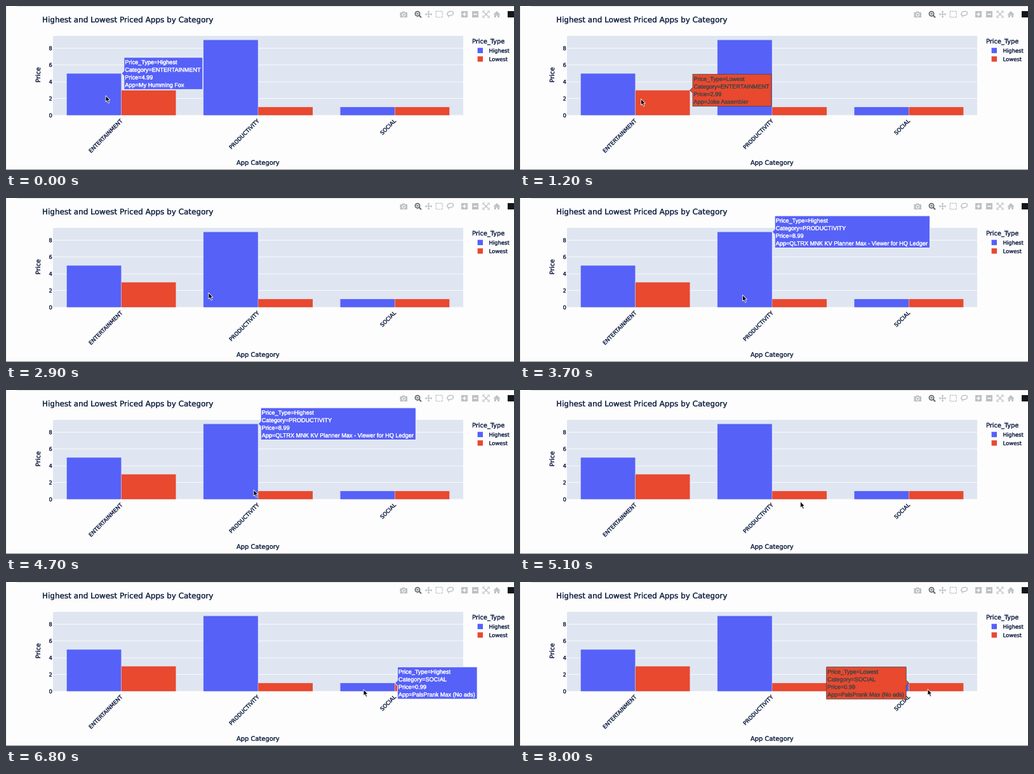
Write a matplotlib script that moves like this. It is 800 by 258 pixels and loops after 8.1 s.

```python
import numpy as np
import matplotlib.pyplot as plt
from matplotlib.animation import FuncAnimation
from matplotlib.patches import Circle, Ellipse, Polygon, Rectangle
from matplotlib.patheffects import withStroke

W, H = 800, 258
FRAMES, STEP = 81, 100

PAPER, PLOT, INK = "#fdfdfe", "#dfe6f2", "#1b2a4a"
BLUE, RED, DARK = "#5661f8", "#e8492f", "#444444"
ICON, ICON_ON = "#bfc0c4", "#66686e"

LEFT, RIGHT, TOP, BASE = 74, 720, 47, 172
UNIT = 13.21                      # pixels per price unit
SLOT = (RIGHT - LEFT) / 3
BAR_W = SLOT * 0.4

APPS = [
    ("ENTERTAINMENT", [(4.99, "My Humming Fox"), (2.99, "Joke Assembler")]),
    ("PRODUCTIVITY", [(8.99, "QLTRX MNK KV Planner Max - Viewer for HQ Ledger"),
                      (0.99, None)]),
    ("SOCIAL", [(0.99, "PalsPrank Max (No ads)")] * 2),
]
KINDS = [("Highest", BLUE, "white"), ("Lowest", RED, DARK)]

# pointer stops: step, x, y
STOPS = [(7, 157, 141), (17, 224, 151), (24, 234, 152), (29, 319, 149),
         (47, 390, 157), (57, 519, 165.5), (68, 563, 169), (76, 642, 168.5)]
DIPS = [(47, 57), (68, 76)]       # legs that pass below the axis
ARROW = np.array([(0, 0), (0, 9.8), (2.2, 7.8), (3.9, 11.8),
                  (5.7, 11.1), (4, 7.2), (7, 7.2)])

fig = plt.figure(figsize=(W / 100, H / 100), dpi=100, facecolor=PAPER)
ax = fig.add_axes([0, 0, 1, 1])
ax.set_xlim(0, W)
ax.set_ylim(H, 0)
ax.axis("off")


def pt(px):
    return px * 0.72


def write(x, y, s, size, font="DejaVu Sans", **kw):
    return ax.text(x, y, s, fontsize=pt(size), color=INK, family=font,
                   va="baseline",
                   path_effects=[withStroke(linewidth=pt(0.22))], **kw)


def add(shape):
    shape.set_snap(False)
    return ax.add_patch(shape)


def rect(x, y, w, h, color, **kw):
    return add(Rectangle((x, y), w, h, fc=color, **{"lw": 0, **kw}))


def disc(x, y, r, color, **kw):
    return add(Circle((x, y), r, fc=color, **{"lw": 0, **kw}))


def poly(points, color, **kw):
    return add(Polygon(points, closed=True, fc=color, **{"lw": 0, **kw}))


def line(xs, ys, color, width, **kw):
    ax.plot(xs, ys, color=color, lw=pt(width), solid_capstyle="butt",
            snap=False, **kw)


def cross(x, y, r, color, width):
    line([x - r, x + r], [y, y], color, width)
    line([x, x], [y - r, y + r], color, width)


def bar_box(cat, kind):
    x = LEFT + SLOT * (cat + 0.1) + BAR_W * kind
    return x, x + BAR_W, BASE - APPS[cat][1][kind][0] * UNIT


def draw_frame():
    line([17, W], [0.5, 0.5], "#dcdcdf", 1)
    line([0.5, 0.5], [0, H], "#e6e6e8", 1)
    line([0, W], [H - 0.5, H - 0.5], "#88888b", 1)


def draw_chart():
    rect(LEFT, TOP, RIGHT - LEFT, BASE - TOP, PLOT, zorder=1)
    for v in range(0, 9, 2):
        y = BASE - v * UNIT
        line([LEFT, RIGHT], [y, y], "white", 0.8, zorder=2)
        write(72.8, y + 3.1, str(v), 8.4, ha="right")
    for c, (name, _) in enumerate(APPS):
        for k, (_, color, _) in enumerate(KINDS):
            x0, x1, y = bar_box(c, k)
            rect(x0, y, x1 - x0, BASE - y, color, ec="#e5ecf6",
                 lw=pt(0.35), zorder=3)
        write(LEFT + SLOT * (c + 0.5) + 2.5, 181.3, name, 8.5, rotation=45,
              rotation_mode="anchor", ha="right")

    write(57, 25.7, "Highest and Lowest Priced Apps by Category", 12)
    write(396.7, 249.8, "App Category", 9.9, ha="center")
    write(54, 108.3, "Price", 9.9, rotation=90, rotation_mode="anchor",
          ha="center")
    write(734, 58.9, "Price_Type", 9.8)
    for k, (name, color, _) in enumerate(KINDS):
        y = 70 + 13.4 * k
        rect(742.6, y - 4.2, 8.4, 8.4, color)
        write(760.5, y + 3.3, name, 8.45)


def draw_toolbar():
    cy = 13
    # camera
    rect(620.5, 10, 11.5, 8, ICON)
    rect(624, 8.6, 4.5, 2, ICON)
    disc(626.2, 13.8, 2.8, PAPER)
    disc(626.2, 13.8, 1.7, ICON)
    # zoom
    disc(648, 12.2, 3.6, "none", ec=ICON_ON, lw=pt(1.7))
    line([650.5, 654], [14.7, 18.2], ICON_ON, 2.1)
    cross(648, 12.2, 1.8, ICON_ON, 1)
    # pan
    cross(665.5, cy, 4.5, ICON, 1.3)
    for dx, dy in [(1, 0), (-1, 0), (0, 1), (0, -1)]:
        tip = np.array([665.5 + 5.8 * dx, cy + 5.8 * dy])
        back, side = np.array([dx, dy]) * 2.4, np.array([dy, dx]) * 2.1
        poly([tip, tip - back + side, tip - back - side], ICON)
    # box select
    rect(677.2, 8.3, 10, 9.5, "none", ec=ICON, lw=pt(1.4), ls=(0, (1.5, 0.9)))
    # lasso
    add(Ellipse((699.7, 11.8), 10, 6.6, angle=-15, fc="none", ec=ICON,
                lw=pt(1.4)))
    line([696.2, 697.2], [14, 18], ICON, 1.3)
    # zoom in and out
    for x in (722, 739):
        rect(x - 5, cy - 5, 10, 10, ICON)
    cross(722, cy, 3, PAPER, 1.6)
    line([736, 742], [cy, cy], PAPER, 1.6)
    # autoscale
    for dx in (-1, 1):
        for dy in (-1, 1):
            x, y = 756 + 5 * dx, cy + 5 * dy
            line([x - 3 * dx, x, x], [y, y, y - 3 * dy], ICON, 1.2)
            line([756, 756 + 3.4 * dx], [cy, cy + 3.4 * dy], ICON, 1.3)
    # home
    poly([(767.2, 13.6), (773, 8), (778.8, 13.6)], ICON)
    rect(769, 13.6, 8, 4.4, ICON)
    rect(771.8, 15, 2.4, 3, PAPER)
    # badge
    rect(790, 8, 10, 10, "#14161c")


draw_frame()
draw_chart()
draw_toolbar()

tag = poly([(0, 0), (1, 0), (1, 1)], BLUE, lw=pt(0.8), zorder=10)
rows = [write(0, 0, "", 9.14, font="Liberation Sans", zorder=11)
        for _ in range(4)]
pointer = poly(ARROW, "black", ec="white", lw=pt(0.8), zorder=20)


def pointer_at(i):
    steps, xs, ys = zip(*STOPS)
    x, y = np.interp(i, steps, xs), np.interp(i, steps, ys)
    for a, b in DIPS:
        if a < i < b:
            y = min(y + 60 * np.sin(np.pi * (i - a) / (b - a)), BASE + 3.5)
    return np.array([x, y])


def hovered(i):
    x, y = pointer_at(i)
    for c in range(3):
        for k in range(2):
            x0, x1, top = bar_box(c, k)
            if x0 <= x < x1 and top <= y <= BASE and APPS[c][1][k][1]:
                return c, k
    return None


def show_tag(c, k):
    name, offers = APPS[c]
    price, app = offers[k]
    kind, fill, ink = KINDS[k]
    lines = [f"Price_Type={kind}", f"Category={name}",
             f"Price={price}", f"App={app}"]
    for row, s in zip(rows, lines):
        row.set_text(s)
        row.set_color(ink)
    w = max(row.get_window_extent().width for row in rows) + 4

    x0, x1, y = bar_box(c, k)
    a, h = 4.2, 25.2
    side, x = (1, x1) if x1 + a + w < W else (-1, x0)
    near, far = x + side * a, x + side * (a + w)
    tag.set_xy([(x, y), (near, y - a), (near, y - h), (far, y - h),
                (far, y + h), (near, y + h), (near, y + a)])
    tag.set_facecolor(fill)
    tag.set_edgecolor(ink)
    for n, row in enumerate(rows):
        row.set_position((min(near, far) + 1.5, y - 14.6 + 11.95 * n))


def update(i):
    pointer.set_xy(ARROW + pointer_at(i))
    hit = hovered(max(i - 1, 0))      # the tag trails the pointer by one step
    for item in [tag, *rows]:
        item.set_visible(hit is not None)
    if hit:
        show_tag(*hit)
    return [tag, *rows, pointer]


anim = FuncAnimation(fig, update, frames=FRAMES, interval=STEP, repeat=True,
                     repeat_delay=0, blit=False)
plt.show()
```
